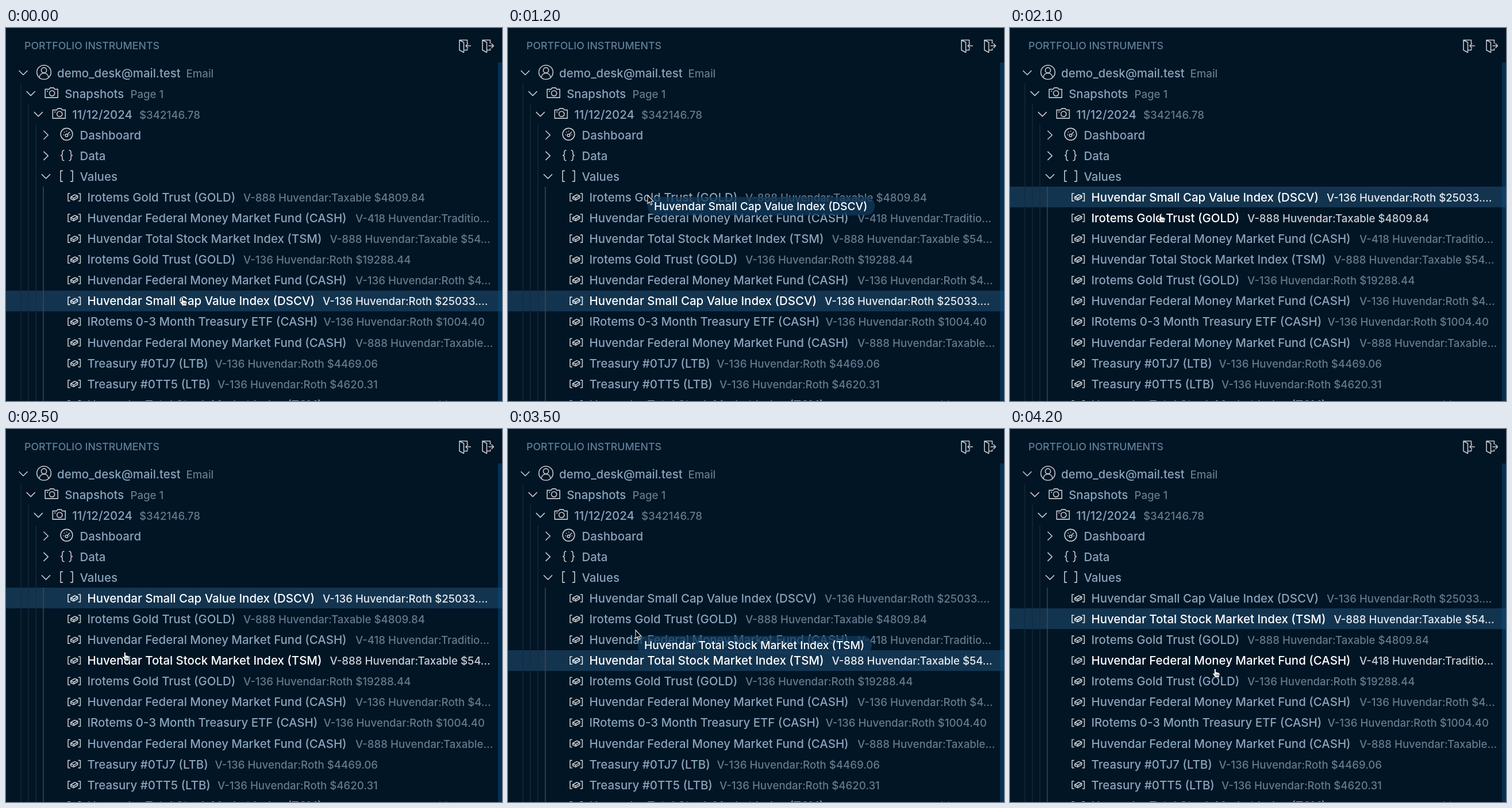
Animation of 863x649 px, one loop 4.5 s. Source, as an HTML page:

```html
<!DOCTYPE html>
<html lang="en">
<head>
<meta charset="utf-8">
<title>Portfolio instruments</title>
<style>
  html, body { margin: 0; width: 100%; height: 100%; overflow: hidden; background: #011525; }
  svg { display: block; width: 863px; height: 649px; font: 500 20.45px Inter, Roboto, sans-serif; }
  .name { fill: #89a4bb; }
  .desc { font-size: 18.65px; fill: #637a8d; }
  .title { font-size: 17.8px; fill: #5f7e97; }
  .hover .name, .selected .name { fill: #fff; }
  .hover .desc { fill: #c8ced4; }
  .selected .desc { fill: #e6ebef; }
  .icon { fill: none; stroke: #c5c9cc; stroke-width: 1.6; stroke-linejoin: round; }
  .selected .icon { stroke: #e4e8ea; }
  .ghost text { font-size: 19.2px; fill: #fff; }
</style>
</head>
<body>
<svg id="stage" viewBox="0 0 863 649"></svg>
<script>
const ROW = 36.08, FIRST = 78, LOOP = 4500, STEP = 100;
const stage = document.getElementById('stage');
const rowY = i => FIRST + ROW * i;

function add(parent, tag, attrs = {}, text) {
  const el = document.createElementNS('http://www.w3.org/2000/svg', tag);
  for (const key in attrs) el.setAttribute(key, attrs[key]);
  if (text) el.textContent = text;
  parent.appendChild(el);
  return el;
}
const move = (el, x, y) => el.setAttribute('transform', `translate(${x} ${y})`);
const icon = (parent, d, x = 0, y = 0) =>
  add(parent, 'path', { class: 'icon', d, transform: `translate(${x} ${y})` });
const label = (parent, cls, x, text) => add(parent, 'text', { class: cls, x, y: 7.5 }, text);

// Icon outlines, centred on 0,0
const ring = (x, y, r) => `M${x - r} ${y}a${r} ${r} 0 1 0 ${2 * r} 0a${r} ${r} 0 1 0 ${-2 * r} 0`;
const ICONS = {
  open: 'M-7.5 -4L0 3.5L7.5 -4',
  closed: 'M-4 -7.5L3.8 0L-4 7.5',
  account: ring(0, -.5, 12.3) + ring(0, -4, 4.6) + 'M-8 8.5C-7 -1.5 7 -1.5 8 8.5',
  camera: 'M-11 -7H-4L-2.5 -9.5H4L5.5 -7H11V7.5H-11Z' + ring(1, 0, 4.6) + 'M-8 -3.5H-6',
  gauge: ring(0, -1, 10.4) + ring(0, 1, 2.3) + 'M1.5 -.8L5.5 -5M-6 0H-4.5M-4.5 -5L-3.5 -4M0 -7V-5.5M5 0H6.5',
  braces: 'M-4 -9Q-7.5 -9 -7.5 -5.5V-3Q-7.5 0 -10 0Q-7.5 0 -7.5 3V5.5Q-7.5 9 -4 9' +
          'M4 -9Q7.5 -9 7.5 -5.5V-3Q7.5 0 10 0Q7.5 0 7.5 3V5.5Q7.5 9 4 9',
  brackets: 'M-6.5 -9.5H-10.5V9H-6.5M6.5 -9.5H10.5V9H6.5',
  value: 'M-7 -6.5H-10.7V6.5H-7M7 -6.5H10.7V6.5H7M-6 -.5L1 -4.5L6 -2.5V1L-1 5L-6 2.8ZM-6 -.5L-1 1.7L6 -2.5M-1 1.7V5',
  door: 'M-9 -10L-1.5 -6V11.5L-9 7.5ZM-9 -10H4.5V-4M4.5 4.5V7.5H-1.5',
  arrowIn: 'M11 0H2M6 -4L2 0L6 4',
  arrowOut: 'M1.5 0H10.5M6.5 -4L10.5 0L6.5 4',
};

// Header
add(stage, 'text', { class: 'title', x: 32, y: 37 }, 'PORTFOLIO INSTRUMENTS');
icon(stage, ICONS.door + ICONS.arrowIn, 798, 31);
icon(stage, ICONS.door + ICONS.arrowOut, 838, 31);

const band = add(stage, 'rect', { width: 863, height: 36, fill: '#13344f' });
add(stage, 'rect', { x: 856, y: 60, width: 7, height: 589, fill: '#084d81', opacity: .5 });
[[26, 96, '#182b3b'], [39, 132, '#182b3b'], [52, 168, '#182b3b'], [65, 276, '#57493f']]
  .forEach(([x, y, fill]) => add(stage, 'rect', { x: x - .7, y, width: 1.3, height: 649 - y, fill }));

// Parent nodes: depth, chevron, icon, name, description, description x
[
  [0, 'open', 'account', 'demo_desk@mail.test', 'Email', 313.5],
  [1, 'open', 'camera', 'Snapshots', 'Page 1', 216.5],
  [2, 'open', 'camera', '11/12/2024', '$342146.78', 232],
  [3, 'closed', 'gauge', 'Dashboard'],
  [3, 'closed', 'braces', 'Data'],
  [3, 'open', 'brackets', 'Values'],
].forEach(([depth, chevron, glyph, name, desc, descX], i) => {
  const row = add(stage, 'g');
  const indent = depth * 13.15;
  move(row, 0, rowY(i));
  icon(row, ICONS[chevron], 30 + indent, 0);
  icon(row, ICONS[glyph], 66 + indent, -.5);
  label(row, 'name', 89 + indent, name);
  if (desc) label(row, 'desc', descX, desc);
});

// Instruments: name, description, description x
const FUND = 'Huvendar Federal Money Market Fund (CASH)';
const GOLD = 'Irotems Gold Trust (GOLD)';
const TOTAL = 'Huvendar Total Stock Market Index (TSM)';
const SMALL = 'Huvendar Small Cap Value Index (DSCV)';
const rows = [
  [GOLD, 'V-888 Huvendar:Taxable $4809.84', 413],
  [FUND, 'V-418 Huvendar:Traditio…', 608],
  [TOTAL, 'V-888 Huvendar:Taxable $54…', 563.5],
  [GOLD, 'V-136 Huvendar:Roth $19288.44', 413],
  [FUND, 'V-136 Huvendar:Roth $4…', 608],
  [SMALL, 'V-136 Huvendar:Roth $25033.…', 551],
  ['IRotems 0-3 Month Treasury ETF (CASH)', 'V-136 Huvendar:Roth $1004.40', 552.5],
  [FUND, 'V-888 Huvendar:Taxable…', 608],
  ['Treasury #0TJ7 (LTB)', 'V-136 Huvendar:Roth $4469.06', 363.5],
  ['Treasury #0TT5 (LTB)', 'V-136 Huvendar:Roth $4620.31', 368],
  [TOTAL, 'V-418 Huvendar:Traditional…', 563.5],
].map(([name, desc, descX]) => {
  const row = add(stage, 'g');
  icon(row, ICONS.value, 118.7, 0);
  label(row, 'name', 141.5, name);
  label(row, 'desc', descX, desc);
  return row;
});

const ghost = add(stage, 'g', { class: 'ghost' });
const pill = add(ghost, 'rect', { height: 32, rx: 15, fill: '#12395a', opacity: .76 });
const ghostText = add(ghost, 'text', { x: 11, y: 23 });

const arrow = add(stage, 'path', {
  d: 'M0 0V14.5L3.3 11.5L5.6 16.8L7.8 15.8L5.6 10.8H10.2Z',
  fill: '#05080b', stroke: '#e8ecef', 'stroke-width': 1.1 });
const hand = add(stage, 'g');
add(hand, 'path', {
  d: 'M-1.8 1.2Q0 -1 1.4 1.2V6Q3 5 4 6.5Q5.5 5.8 6.2 7.2Q8.5 7 8.2 10L6.8 15.5H-.2Q-2 12 -4.6 9Q-4.4 6.6 -1.8 8.6Z',
  fill: '#f4f6f7', stroke: '#0b0f14', 'stroke-width': 1 });
add(hand, 'path', { d: 'M1.8 9.5V13M4 9.5V13M6 9.5V13', stroke: '#0b0f14', 'stroke-width': .7 });

// Pointer path: time, x, y, ghost offset
const PATH = [
  [0, 307, 468], [100, 300, 465], [200, 180, 390], [300, 63, 240], [400, 190, 69],
  [500, 409, 170], [600, 390, 370], [700, 330, 447], [800, 267, 376], [900, 73, 200],
  [1000, 210, 28], [1100, 449, 170], [1200, 243, 291, 0, 3], [1300, 190, 150],
  [1400, 205, 56], [1500, 240, 210], [1600, 245, 289], [1800, 245, 289],
  [2100, 262, 323], [2200, 252, 344], [2400, 214, 377], [2500, 207, 388],
  [2600, 205, 394], [2800, 205, 394], [2900, 213, 391], [3100, 231, 381], [3200, 231, 381],
  [3500, 222, 350, 4, 10], [3700, 217, 344], [3900, 217, 344], [4000, 250, 362],
  [4200, 357, 417], [LOOP, 357, 417],
];

function pointerAt(t) {
  const i = PATH.findIndex(p => p[0] > t);
  const [ta, ax, ay, adx = 5, ady = 9] = PATH[i - 1];
  const [tb, bx, by, bdx = 5, bdy = 9] = PATH[i];
  const mix = (a, b) => a + (b - a) * (t - ta) / (tb - ta);
  return { x: mix(ax, bx), y: mix(ay, by), dx: mix(adx, bdx), dy: mix(ady, bdy) };
}

function orderAt(t) {
  const order = rows.map((_, i) => i);
  const lift = (from, to) => order.splice(to, 0, order.splice(from, 1)[0]);
  if (t >= 1700) lift(5, 0);
  if (t >= 4000) lift(3, 1);
  return order;
}

const show = (el, on) => el.setAttribute('visibility', on ? 'visible' : 'hidden');

function draw(time) {
  const t = Math.floor((time % LOOP) / STEP) * STEP;
  const { x, y, dx, dy } = pointerAt(t);
  const dragging = (t >= 100 && t < 1600) || (t >= 2900 && t < 3900);
  const selected = t < 2800 ? 5 : 2;
  const hovered = dragging ? -1 : Math.floor((y - FIRST) / ROW + .5) - 6;

  orderAt(t).forEach((id, slot) => {
    const row = rows[id];
    move(row, 0, rowY(slot + 6));
    row.setAttribute('class', id === selected ? 'selected' : slot === hovered ? 'hover' : '');
    if (id === selected) band.setAttribute('y', Math.round(rowY(slot + 6) - 18.2));
  });

  show(ghost, dragging);
  show(arrow, dragging);
  show(hand, !dragging);
  move(ghost, x + dx, y + dy);
  ghostText.textContent = selected === 5 ? SMALL : TOTAL;
  pill.setAttribute('width', selected === 5 ? 395 : 407);
  move(arrow, x, y);
  move(hand, x, y);
}

const start = performance.now();
function tick() {
  draw(performance.now() - start);
  requestAnimationFrame(tick);
}
draw(0);
requestAnimationFrame(tick);
</script>
</body>
</html>
```
